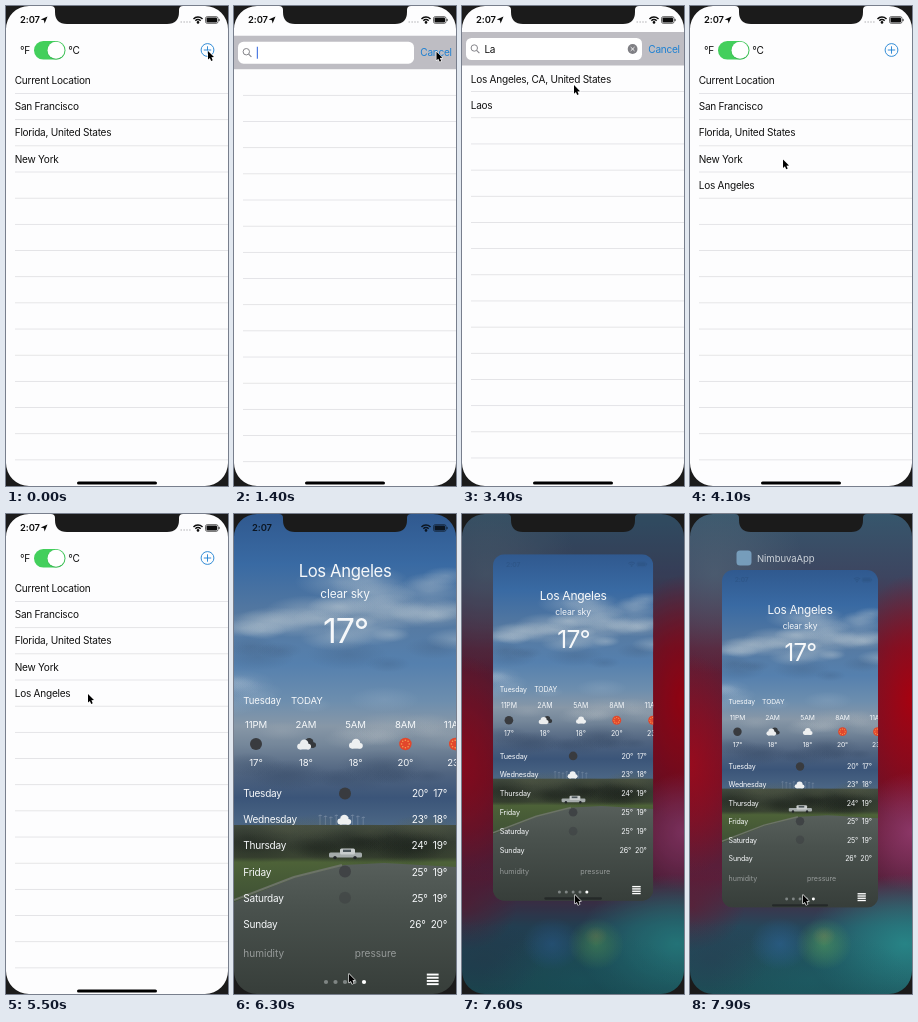
Recreate the animation shown at these times as an HTML page with a canvas. Size 222 by 480 pixels, loop 8000 ms.

```html
<!DOCTYPE html>
<html lang="en">
<head>
<meta charset="utf-8">
<title>City weather</title>
<style>
html, body { margin: 0; width: 100%; height: 100%; overflow: hidden; background: #1b1b1b; }
canvas { display: block; width: 100vw; height: 100vh; }
</style>
</head>
<body>
<canvas id="stage"></canvas>
<script>
const W = 222, H = 480, LOOP = 8000, ROW = 26.17;
const canvas = document.getElementById('stage');
const c = canvas.getContext('2d');
const FONT = 'Inter, Roboto, "Liberation Sans", sans-serif';
const BLUE = '#1d80d2';

const clamp = v => Math.max(0, Math.min(1, v));
const part = (t, a, b) => clamp((t - a) / (b - a));
const smooth = (t, a, b) => { const p = part(t, a, b); return p * p * (3 - 2 * p); };
const easeOut = (t, a, b) => 1 - Math.pow(1 - part(t, a, b), 3);
const mix = (a, b, p) => a + (b - a) * p;
const hash = n => { const v = Math.sin(n * 127.1 + 3.7) * 43758.5453; return v - Math.floor(v); };

function text(s, x, y, { size = 10.05, color = '#111', weight = 400, align = 'left', gap = -0.24 } = {}) {
  c.font = `${weight} ${size}px ${FONT}`;
  c.letterSpacing = gap + 'px';
  c.textAlign = align;
  c.textBaseline = 'alphabetic';
  c.fillStyle = color;
  c.fillText(s, x, y + size * 0.36);
}
function rect(x, y, w, h, color) { c.fillStyle = color; c.fillRect(x, y, w, h); }
function pill(x, y, w, h, r, color) {
  c.fillStyle = color;
  c.beginPath(); c.roundRect(x, y, w, h, r); c.fill();
}
function disc(x, y, r, color) {
  c.fillStyle = color;
  c.beginPath(); c.arc(x, y, r, 0, 7); c.fill();
}
function poly(points, color) {
  c.fillStyle = color;
  c.beginPath();
  points.forEach(p => c.lineTo(p[0], p[1]));
  c.closePath(); c.fill();
}
function lines(segments, color, width) {
  c.strokeStyle = color; c.lineWidth = width;
  c.beginPath();
  for (const [x1, y1, x2, y2] of segments) { c.moveTo(x1, y1); c.lineTo(x2, y2); }
  c.stroke();
}
function fade(y, h, stops) {
  const g = c.createLinearGradient(0, y, 0, y + h);
  stops.forEach(([p, col]) => g.addColorStop(p, col));
  rect(0, y, W, h, g);
}
// soft elliptical spot; rgb is "r,g,b"
function glow(x, y, rx, ry, rgb, a) {
  c.save();
  c.translate(x, y); c.scale(rx, ry);
  const g = c.createRadialGradient(0, 0, 0, 0, 0, 1);
  g.addColorStop(0, `rgba(${rgb},${a})`);
  g.addColorStop(0.5, `rgba(${rgb},${a * 0.55})`);
  g.addColorStop(1, `rgba(${rgb},0)`);
  c.fillStyle = g;
  c.fillRect(-1, -1, 2, 2);
  c.restore();
}

function statusBar(color, arrow) {
  text('2:07', arrow ? 14 : 18, 14, { size: 9.4, weight: 600, color, gap: -0.1 });
  if (arrow) {
    poly([[41.5, 10.6], [38.6, 17.4], [37.9, 14.2], [34.7, 13.5]], color);
    for (let i = 0; i < 4; i++) disc(175.2 + i * 2.9, 16, 0.75, '#b5b5b8');
  }
  c.strokeStyle = color; c.lineWidth = 1.5;
  for (const r of [3.6, 6.2]) {
    c.beginPath(); c.arc(192, 17.2, r, -Math.PI * 0.76, -Math.PI * 0.24); c.stroke();
  }
  disc(192, 16.4, 1.3, color);
  c.lineWidth = 0.6;
  c.beginPath(); c.roundRect(199.5, 10.6, 12.5, 6.8, 1.8); c.stroke();
  pill(200.5, 11.6, 10.5, 4.8, 0.9, color);
  rect(212.6, 12.9, 0.9, 2.2, color);
}
const homeBar = color => pill(71, 475.4, 80, 3.2, 1.6, color);

function separators(first) {
  for (let i = 0; i < 15; i++) rect(9, first + i * ROW, W - 9, 0.8, '#dfdfe2');
}

function cityList(t) {
  rect(0, 0, W, H, '#fdfdfe');
  text('°F', 14, 44.3);
  text('°C', 62.3, 44.3);
  pill(28, 35, 31.5, 18.6, 9.3, '#43cf5c');
  disc(50, 44.6, 9, '#3ab552');
  disc(50, 44.3, 8.5, '#fff');

  c.globalAlpha = 1 - 0.65 * (smooth(t, 550, 650) - smooth(t, 720, 850));
  c.strokeStyle = BLUE; c.lineWidth = 0.9;
  c.beginPath(); c.arc(201.5, 44, 6.4, 0, 7); c.stroke();
  lines([[197.8, 44, 205.2, 44], [201.5, 40.3, 201.5, 47.7]], BLUE, 0.9);
  c.globalAlpha = 1;

  const names = ['Current Location', 'San Francisco', 'Florida, United States', 'New York'];
  if (t > 3600) names.push('Los Angeles');
  if (t >= 5570) rect(0, 166 + 0.8, W, ROW - 0.8, '#d9d9dc');
  separators(87.1);
  names.forEach((n, i) => text(n, 8.7, 74.5 + i * ROW));
}

function searchSheet(t) {
  rect(0, 0, W, H, '#fdfdfe');
  rect(0, 26, W, 33.5, '#bebdc3');
  pill(4, 32, 176, 22, 5.5, '#fff');
  c.strokeStyle = '#85858a'; c.lineWidth = 1;
  c.beginPath(); c.arc(12.3, 42, 3.2, 0, 7); c.stroke();
  lines([[14.6, 44.4, 17.4, 47.2]], '#85858a', 1.1);
  const query = t < 1950 ? '' : t < 2270 ? 'L' : 'La';
  text(query, 22.4, 43);
  if (t < 2850 || t > 3500) rect(22.8 + c.measureText(query).width, 37, 1.1, 12, '#3d6fe0');
  if (query) {
    disc(170.6, 43, 4.9, '#7f7f84');
    lines([[168.7, 41.1, 172.5, 44.9], [172.5, 41.1, 168.7, 44.9]], '#fff', 0.9);
  }
  text('Cancel', 186.3, 43, { color: BLUE });
  if (t >= 3550) rect(0, 59.5, W, 26, '#d9d9dc');
  separators(85.2);
  if (t >= 2370) {
    text('Los Angeles, CA, United States', 8.7, 73);
    text('Laos', 8.7, 99.3);
  }
}

// scatter of soft puffs inside an ellipse
function puffs(seed, n, x, y, rx, ry, rgb, a) {
  for (let i = 0; i < n; i++) {
    const k = seed * 50 + i * 3, r = 12 + 20 * hash(k + 2);
    glow(x + rx * (hash(k) * 2 - 1), y + ry * (hash(k + 1) * 2 - 1), r * 1.5, r * 0.55, rgb, a);
  }
}

function landscape() {
  fade(0, 312, [[0, '#30598f'], [0.16, '#396aa3'], [0.33, '#5679a0'], [0.48, '#5580ae'],
    [0.6, '#6d8eae'], [0.68, '#8797a7'], [0.74, '#75879a'], [0.83, '#506480'], [0.91, '#3b5579'], [1, '#4c6785']]);
  const pale = '184,198,208', dark = '52,72,100';
  puffs(1, 7, 165, 70, 60, 16, pale, 0.34);
  puffs(2, 14, 60, 108, 75, 18, pale, 0.4);
  puffs(3, 8, 180, 108, 50, 18, pale, 0.36);
  puffs(4, 6, 110, 142, 110, 12, dark, 0.18);
  puffs(5, 9, 110, 180, 115, 14, '160,182,204', 0.24);
  puffs(6, 10, 110, 217, 115, 9, '170,180,188', 0.26);
  puffs(7, 9, 110, 258, 115, 12, dark, 0.28);
  // wind farm
  for (let i = 0; i < 9; i++) {
    const x = 86 + i * 5.4, y = 301 + (i % 3);
    lines([[x, y, x, 312], [x - 1.7, y + 1, x, y], [x, y, x + 1.8, y + 0.6]], 'rgba(205,216,226,.5)', 0.5);
  }
  fade(311, 169, [[0, '#434c40'], [0.1, '#363e33'], [0.19, '#3a4432'], [0.22, '#4d6238'], [0.45, '#3f5135'], [1, '#38403a']]);
  puffs(8, 12, 110, 329, 115, 9, '24,30,25', 0.3);
  puffs(9, 6, 110, 315, 115, 3, '88,94,70', 0.2);
  const g = c.createLinearGradient(0, 345, 0, H);
  g.addColorStop(0, '#58605c'); g.addColorStop(0.35, '#4a524e'); g.addColorStop(1, '#373e3a');
  poly([[110, 351], [150, 349], [222, 353], [222, H], [0, H], [0, 388], [60, 364]], g);
  lines([[0, 386, 60, 363], [60, 363, 108, 351]], '#6c7367', 2);
  // van
  pill(95, 338.5, 33, 5, 1.5, '#a5abab');
  pill(106, 334.6, 15, 6, 1.5, '#c9cdcd');
  rect(109, 335.6, 8, 2.4, '#4b555a');
  disc(101, 343.6, 1.7, '#24282a'); disc(121, 343.6, 1.7, '#24282a');
}

function cloud(x, y, color) {
  disc(x - 3.6, y + 1.6, 3, color);
  disc(x + 0.4, y - 1, 4.2, color);
  disc(x + 4.4, y + 1.8, 2.8, color);
  rect(x - 4, y + 1.6, 9, 3, color);
}
const icons = {
  moon(x, y) { disc(x, y, 6, '#393b3f'); },
  broken(x, y) { cloud(x + 3, y - 0.8, '#35383c'); cloud(x - 2, y + 0.8, '#eceeef'); },
  cloud(x, y) { cloud(x, y, '#eef0f1'); },
  sun(x, y) {
    disc(x, y, 6.2, '#e2472c');
    for (let i = 0; i < 8; i++) disc(x + 3.8 * Math.cos(i * 0.785), y + 3.8 * Math.sin(i * 0.785), 0.8, '#f4a052');
  }
};

function weather(lift) {
  landscape();
  const white = '#f6f8fa';
  const mid = { color: white, align: 'center' };
  statusBar(`rgba(12,22,34,${1 - 0.9 * lift})`, false);
  text('Los Angeles', 111, 57, { ...mid, size: 16.7, gap: -0.38 });
  text('clear sky', 111, 80, { ...mid, size: 11.9, gap: -0.15 });
  text('17°', 111.5, 117, { ...mid, size: 34, gap: -1.2 });

  const small = { size: 9.6, color: white, gap: -0.1 };
  text('Tuesday', 9.3, 187, small);
  text('TODAY', 57, 187, small);
  const hours = [['11PM', 'moon', 17], ['2AM', 'broken', 18], ['5AM', 'cloud', 18], ['8AM', 'sun', 20], ['11AM', 'sun', 23]];
  hours.forEach(([label, icon, deg], i) => {
    const x = 22 + i * 49.8;
    text(label, x, 210.3, { ...small, align: 'center' });
    icons[icon](x, 230);
    text(deg + '°', x, 249, { ...small, align: 'center' });
  });

  const days = [['Tuesday', 20, 17], ['Wednesday', 23, 18], ['Thursday', 24, 19],
    ['Friday', 25, 19], ['Saturday', 25, 19], ['Sunday', 26, 20]];
  days.forEach(([day, high, low], i) => {
    const y = 279.5 + i * 26.15;
    text(day, 9.3, y, { color: white });
    text(`${high}°\u00a0\u00a0${low}°`, 213, y, { color: white, align: 'right' });
  });
  icons.moon(111, 279.5);
  icons.cloud(110, 306);
  c.save();
  c.globalAlpha *= 0.75; icons.moon(111, 357.5);
  c.globalAlpha *= 0.6; icons.moon(111, 383.7);
  c.restore();

  const dim = 'rgba(235,238,240,.5)';
  text('humidity', 9.3, 439, { color: dim, gap: 0 });
  text('pressure', 120.8, 439, { color: dim, gap: 0 });
  for (let i = 0; i < 5; i++) disc(92 + i * 9.5, 468, 2.1, i === 4 ? '#fff' : 'rgba(225,228,230,.42)');
  for (let i = 0; i < 4; i++) rect(192.8, 459.6 + i * 3.2, 11.8, 1.9, '#fff');
  homeBar(`rgba(18,20,22,${0.5 * lift})`);
}

function wallpaper(rest) {
  fade(0, H, [[0, '#36566c'], [0.13, '#3d4560'], [0.28, '#5a2038'], [0.55, '#6a1228'],
    [0.76, '#57203c'], [0.86, '#26475a'], [1, '#1c4e56']]);
  glow(25, 60, 90, 100, '84,104,120', 0.6);
  glow(222, 185, 65, 125, '170,0,14', 0.95);
  glow(0, 250, 60, 110, '158,10,28', 0.85);
  glow(222, 318, 55, 60, '150,62,116', 0.8);
  glow(0, 392, 55, 45, '104,22,46', 0.6);
  glow(215, 430, 100, 70, '40,142,142', 0.85);
  glow(120, 465, 100, 50, '28,100,106', 0.5);
  glow(20, 445, 60, 40, '40,62,82', 0.5);
  glow(90, 430, 30, 26, '44,98,150', 0.6);
  glow(134, 430, 28, 26, '78,150,92', 0.65);
  glow(134, 422, 12, 10, '150,140,80', 0.3);
  rect(0, 0, W, H, `rgba(8,12,28,${0.14 * (1 - rest)})`);
}

function weatherScene(t) {
  const lift = smooth(t, 6700, 7520), rest = smooth(t, 7580, 7880);
  if (!lift) return weather(0);
  wallpaper(rest);
  const scale = mix(mix(1, 0.722, lift), 0.703, rest);
  c.save();
  c.translate(mix(31 * lift, 32, rest), mix(40 * lift, 56, rest));
  c.scale(scale, scale);
  c.beginPath(); c.roundRect(0, 0, W, H, mix(23, 16, lift)); c.clip();
  weather(lift);
  c.restore();
  c.globalAlpha = smooth(t, 7630, 7900) * 0.85;
  pill(46.5, 36.5, 15, 15, 3.5, '#7fa9c9');
  text('NimbuvaApp', 67, 44.2, { size: 9.5, color: '#e4e9ec', gap: -0.05 });
  c.globalAlpha = 1;
}

function bezel() {
  c.fillStyle = '#1b1b1b';
  c.beginPath();
  c.rect(-1, -1, W + 2, H + 2);
  c.roundRect(0, 0, W, H, 23);
  c.fill('evenodd');
  // notch
  c.beginPath();
  c.moveTo(45, 0);
  c.quadraticCurveTo(49, 0, 49, 4);
  c.lineTo(49, 6);
  c.quadraticCurveTo(49, 18, 61, 18);
  c.lineTo(161, 18);
  c.quadraticCurveTo(173, 18, 173, 6);
  c.lineTo(173, 4);
  c.quadraticCurveTo(173, 0, 177, 0);
  c.fill();
}

const route = [[0, 202, 45], [50, 202, 45], [120, 202, 45.5], [2750, 203, 46], [3350, 112, 79], [3600, 112, 80],
  [4450, 82, 196], [4550, 82, 196], [4820, 82, 180], [5620, 82, 180], [6250, 115, 460],
  [6350, 115, 460], [6550, 113, 474], [6700, 113, 474], [7520, 113, 381], [LOOP, 113, 381]];
function pointer(t) {
  const i = route.findIndex(p => p[0] > t);
  const a = route[i - 1], b = route[i], p = smooth(t, a[0], b[0]);
  c.save();
  c.translate(mix(a[1], b[1], p), mix(a[2], b[2], p));
  c.beginPath();
  [[0, 0], [0, 8.6], [1.9, 6.9], [3.2, 9.9], [4.7, 9.2], [3.4, 6.3], [6, 6.1]].forEach(q => c.lineTo(...q));
  c.closePath();
  c.lineJoin = 'round';
  c.strokeStyle = 'rgba(255,255,255,.9)'; c.lineWidth = 1.3; c.stroke();
  c.fillStyle = '#000'; c.fill();
  c.restore();
}

function slide(y, draw, t) {
  if (y >= H) return;
  c.save();
  c.translate(0, y);
  draw(t);
  c.restore();
}

function draw(t) {
  const closed = easeOut(t, 5650, 6100);
  if (t >= 5650) weatherScene(t);
  slide(closed * H, cityList, t);
  if (t > 1000 && t < 4200) {
    const y = t < 3000 ? 1 - easeOut(t, 1000, 1500) : smooth(t, 3680, 4150);
    slide(y * H, searchSheet, t);
  }
  if (closed < 0.5) {
    statusBar('#0c0c0c', true);
    homeBar('#000');
  }
  bezel();
  pointer(t);
}

function resize() {
  const dpr = window.devicePixelRatio || 1;
  canvas.width = Math.round(innerWidth * dpr);
  canvas.height = Math.round(innerHeight * dpr);
}
addEventListener('resize', resize);
resize();

const start = performance.now();
function tick() {
  c.setTransform(canvas.width / W, 0, 0, canvas.height / H, 0, 0);
  draw((performance.now() - start) % LOOP);
  requestAnimationFrame(tick);
}
tick();
</script>
</body>
</html>
```
